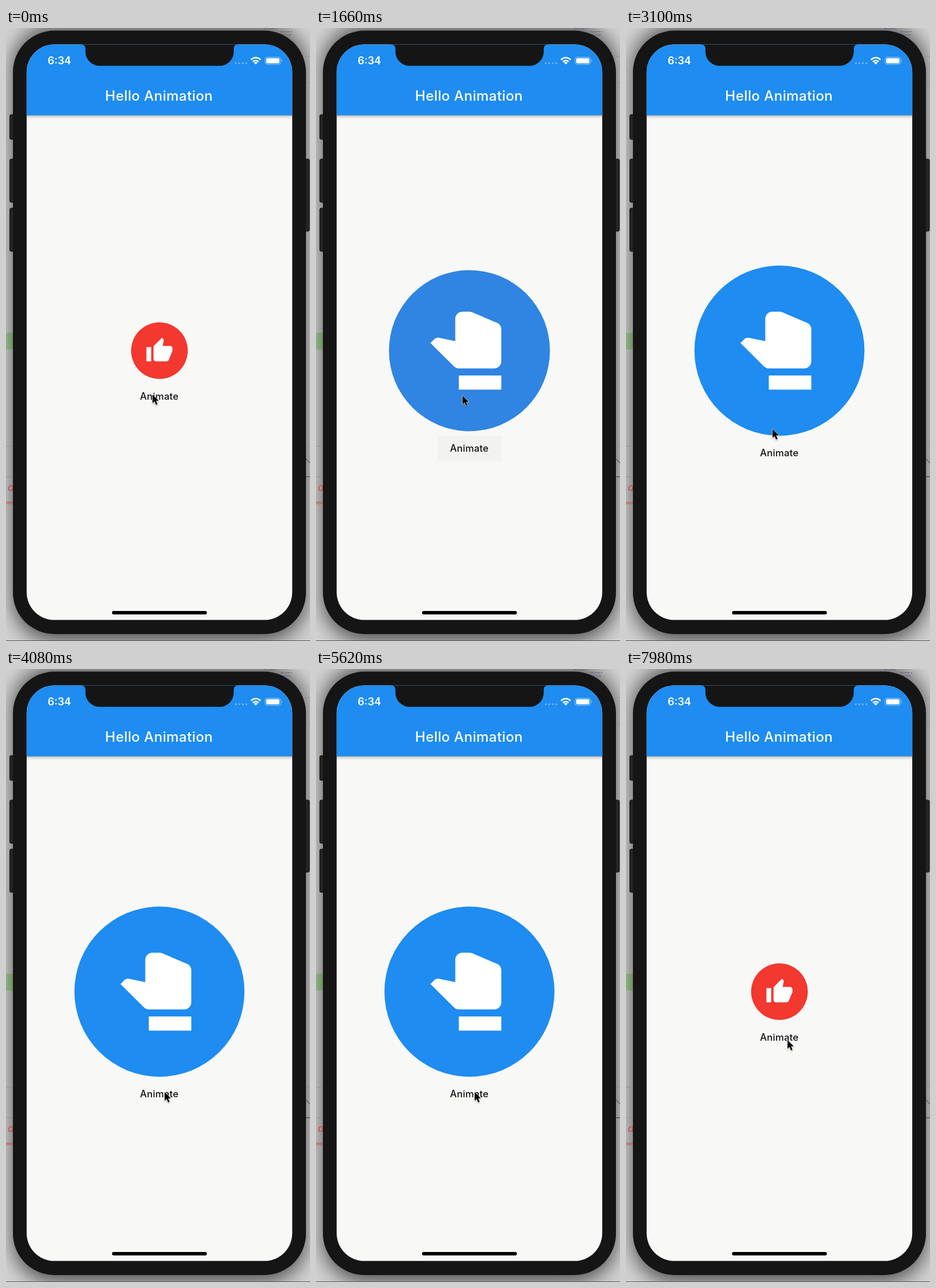
These frames come from a looping animation (527x1062 px, 8 s). An HTML page:

```html
<!DOCTYPE html>
<html lang="en">
<head>
<meta charset="utf-8">
<title>Hello Animation</title>
<style>
html, body { margin: 0; width: 100%; height: 100%; overflow: hidden; }
svg { display: block; width: 527px; height: 1062px; font-family: Inter, "Open Sans", sans-serif; }
</style>
</head>
<body>
<svg viewBox="0 0 527 1062">
  <defs>
    <filter id="blur" x="-20%" y="-20%" width="140%" height="140%"><feGaussianBlur stdDeviation="17"/></filter>
    <filter id="soft" x="-50%" y="-50%" width="200%" height="200%">
      <feDropShadow dx="0" dy="1.5" stdDeviation="1.2" flood-opacity=".35"/>
    </filter>
    <linearGradient id="barShadow" x2="0" y2="1">
      <stop stop-color="#000" stop-opacity=".3"/>
      <stop offset=".4" stop-color="#000" stop-opacity=".08"/>
      <stop offset="1" stop-color="#000" stop-opacity="0"/>
    </linearGradient>
    <clipPath id="screen"><rect x="35.8" y="28.4" width="460.4" height="997.2" rx="48"/></clipPath>
  </defs>

  <!-- desktop behind the phone -->
  <rect width="527" height="1062" fill="#d2d2d2"/>
  <path d="M0 528H14V557H0Z" fill="#a5cf97"/>
  <rect x="12" y="-4" width="508" height="1066" rx="72" opacity=".62" filter="url(#blur)"/>
  <g fill="none" stroke="#8b8b93">
    <path d="M0 724.5H14M0 777.5H14M518 49.5H527M518 94.5H527M518 724.5H527" opacity=".7"/>
    <path d="M518 744L527 754M518 777.5H527" stroke="#333"/>
    <path d="M0 821.5H14M0 824H14" stroke="#cf4640"/>
    <path d="M448 1.5H468M476 6.5H496M478 12H496M480 17.5H490" stroke="#6a527d" stroke-dasharray="5 2 3 1"/>
    <path d="M0 1061.5H527" stroke="#555"/>
  </g>
  <text x="3" y="802" font-size="18" font-style="italic" fill="#d6453f">a</text>

  <!-- phone body -->
  <g fill="#242424" stroke="#111">
    <rect x="6.5" y="150" width="10" height="43" rx="2.5"/>
    <rect x="6.5" y="227" width="10" height="75" rx="2.5"/>
    <rect x="6.5" y="312" width="10" height="75" rx="2.5"/>
    <rect x="516" y="227" width="10" height="125" rx="2.5"/>
  </g>
  <rect x="12" y="4.5" width="508" height="1045.5" rx="72" fill="#151515"/>

  <g clip-path="url(#screen)">
    <rect x="35" y="28" width="462" height="998" fill="#f8f8f7"/>
    <rect x="35" y="151" width="462" height="8" fill="url(#barShadow)"/>
    <rect x="35" y="28" width="462" height="123.2" fill="#1e8cf0"/>
    <path d="M130 27V28.4Q137.700 28.400 137.700 36V41A24.500 24.500 0 0 0 162.200 65.500H370.300A24.500 24.500 0 0 0 394.800 41V36Q394.800 28.400 402.500 28.400V27Z" fill="#151515"/>
    <g fill="#fff">
      <text x="92.5" y="63.3" font-size="18" font-weight="600" text-anchor="middle">6:34</text>
      <text x="265.3" y="125.6" font-size="24" font-weight="500" text-anchor="middle" letter-spacing=".42">Hello Animation</text>
      <path d="M398.500 61H417" stroke="#fff" stroke-width="3.6" stroke-linecap="round" stroke-dasharray="0 6" opacity=".35"/>
      <path d="M433 63.3L429.800 60Q433 57.300 436.200 60Z"/>
      <path d="M424.700 55Q433 47.500 441.300 55M428 58.500Q433 54 438 58.500" fill="none" stroke="#fff" stroke-width="2.500"/>
      <rect x="449" y="50.500" width="27" height="12.500" rx="3.500" fill="none" stroke="#fff" stroke-opacity=".5"/>
      <rect x="451" y="52.300" width="23" height="9" rx="2"/>
      <path d="M477.500 54.500Q480 56.700 477.500 59Z" opacity=".5"/>
    </g>
    <rect x="183.8" y="1010" width="164.5" height="6.1" rx="3"/>

    <circle id="avatar" cx="266" cy="559"/>
    <path id="thumb" fill="#fff" d="M1 21h4V9H1v12zm22-11c0-1.1-.9-2-2-2h-6.31l.95-4.57.03-.32c0-.41-.17-.79-.44-1.06L14.17 1 7.59 7.59C7.22 7.95 7 8.45 7 9v10c0 1.1.9 2 2 2h9c.83 0 1.54-.5 1.84-1.22l3.02-7.05c.09-.23.14-.47.14-.73v-2z"/>
    <g id="button">
      <rect id="glow" x="211" y="8" width="110" height="44" rx="2.5"/>
      <text x="265.8" y="35.8" font-size="16.6" font-weight="500" text-anchor="middle" letter-spacing=".25" fill="#111">Animate</text>
    </g>
  </g>

  <path id="cursor" d="M0 0V17L3.900 13.400 6.900 20.300 9.900 19 7 12.200H12.300Z" stroke="#fff" stroke-width="1.300" paint-order="stroke" filter="url(#soft)"/>
</svg>
<script>
const LOOP = 8000, GROW = 1477, SHRINK = 5900, RESIZE = 200;
const RED = [242, 56, 47], BLUE = [30, 140, 240];
// Pointer path: time, x, y
const PATH = [[0, 254, 635], [400, 254, 635], [600, 254, 637], [2750, 254, 637], [3100, 254, 695],
  [3500, 275, 733], [7000, 275, 733], [7600, 280, 643], [LOOP, 280, 643]];

const $ = id => document.getElementById(id);
const clamp = v => Math.max(0, Math.min(1, v));
const mix = (a, b, k) => a + (b - a) * k;
const ramp = (t, start, length) => clamp((t - start) / length);

function pointerAt(t) {
  const i = PATH.findIndex(p => p[0] > t);
  const [t0, x0, y0] = PATH[i - 1], [t1, x1, y1] = PATH[i];
  const k = ramp(t, t0, t1 - t0);
  return [mix(x0, x1, k), mix(y0, y1, k)];
}

// Highlight rises while the button is held, fades after release
const press = (t, release) => Math.min(ramp(t, release - 120, 100), 1 - ramp(t, release, 240));

function draw(t) {
  const k = ramp(t, GROW, RESIZE) - ramp(t, SHRINK, RESIZE);
  const r = mix(49.1, 147.4, k);
  $('avatar').setAttribute('r', r);
  $('avatar').setAttribute('fill', `rgb(${RED.map((c, i) => Math.round(mix(c, BLUE[i], k)))})`);

  // The icon switches at once; only the disc is eased
  const big = t >= GROW && t < SHRINK;
  $('thumb').setAttribute('transform',
    `translate(266 559) rotate(${big ? -90 : 0}) scale(${big ? 6.14 : 2.047}) translate(-12 -12)`);

  $('button').setAttribute('transform', `translate(0 ${559 + r})`);
  $('glow').setAttribute('opacity', 0.1 * Math.max(press(t, GROW), press(t, SHRINK)));
  $('cursor').setAttribute('transform', `translate(${pointerAt(t)}) scale(.88)`);
}

function tick() {
  draw(performance.now() % LOOP);
  requestAnimationFrame(tick);
}
tick();
</script>
</body>
</html>
```
